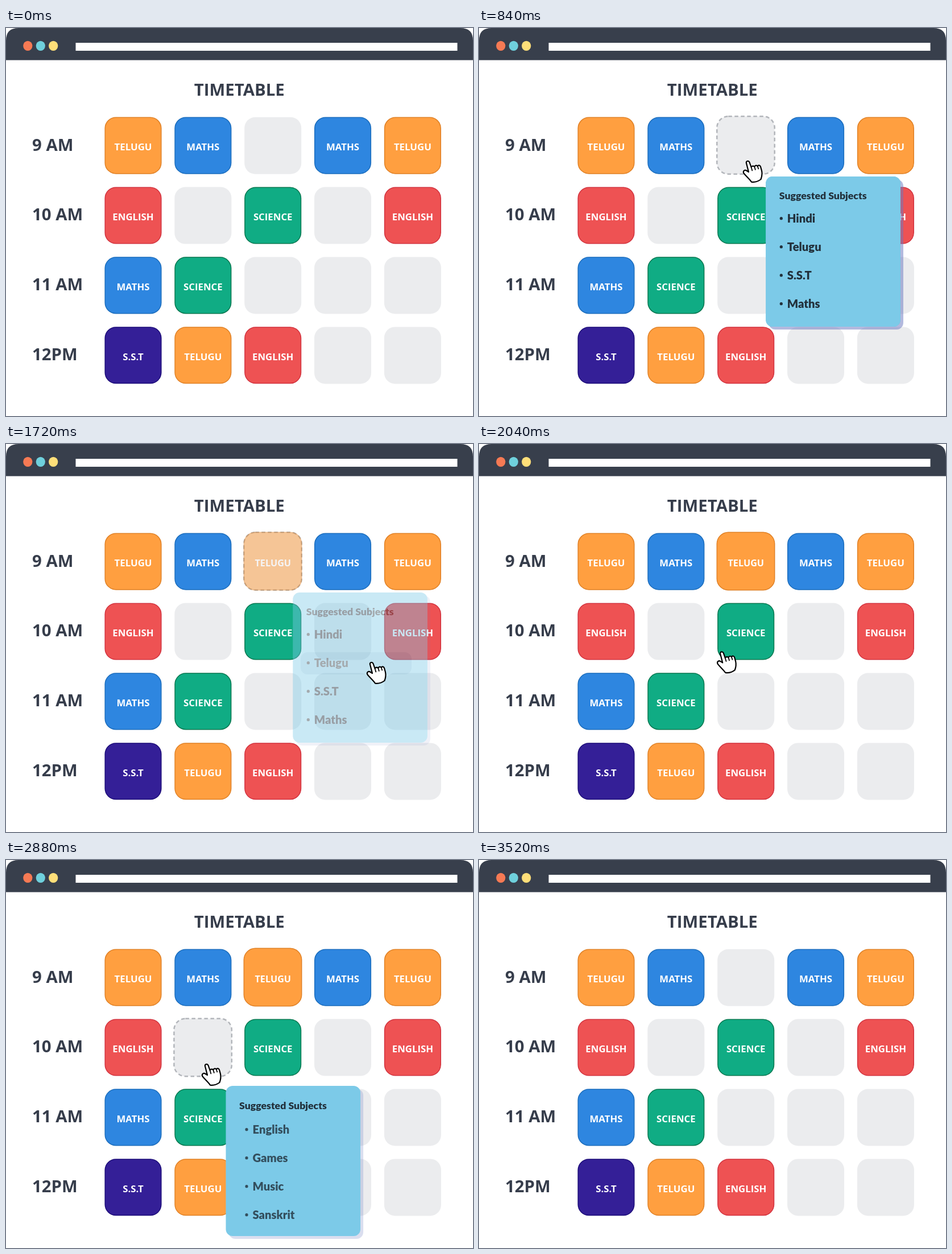
Write an HTML page that moves like this. It is 821x682 px and loops after 5040 ms.

```html
<!DOCTYPE html>
<html lang="en">
<head>
<meta charset="utf-8">
<title>Timetable</title>
<style>
  html, body { margin: 0; width: 100%; height: 100%; overflow: hidden; background: #fff; }
  svg { display: block; width: 100vw; height: 100vh; }
  text { font-family: "Open Sans", "Noto Sans", sans-serif; font-weight: 700; }
  .big { font-size: 29.4px; fill: #363d4b; }
  .label { font-size: 16.8px; fill: #fff; text-anchor: middle; }
  .head, .item { font-family: Lato, "Open Sans", sans-serif; font-weight: 900; fill: #22303b; }
  .head { font-size: 17.7px; }
  .item { font-size: 20.2px; }
  .dash { fill: #ebecee; stroke: #b3b6bb; stroke-width: 2.5; stroke-dasharray: 6.5 4.5; }
</style>
</head>
<body>
<svg viewBox="0 0 821 682" xmlns="http://www.w3.org/2000/svg">
  <defs>
    <g id="menu1"></g>
    <g id="menu2"></g>
  </defs>

  <path d="M0 56.5V22Q0 0 22 0H799Q821 0 821 22V56.5Z" fill="#383f4c"/>
  <ellipse cx="38.3" cy="31.3" rx="8.1" ry="8.6" fill="#f67a54"/>
  <ellipse cx="60.8" cy="31.3" rx="8.1" ry="8.6" fill="#6fd0dc"/>
  <ellipse cx="83.2" cy="31.3" rx="8.1" ry="8.6" fill="#ffdf79"/>
  <rect x="122.5" y="26" width="671" height="14" fill="#fff"/>
  <text class="big" x="410.3" y="119" text-anchor="middle">TIMETABLE</text>

  <g id="grid"></g>

  <rect id="slot1" class="dash" x="418.3" y="155.3" width="101.4" height="101.4" rx="20"/>
  <g id="pick">
    <rect x="418.3" y="155.3" width="101.4" height="101.4" rx="20" fill="#ff9f40" stroke="#e08126" stroke-width="1.5"/>
    <text class="label" x="469.3" y="215" style="font-size:16.2px">TELUGU</text>
  </g>
  <rect id="slot2" class="dash" x="295.4" y="278.8" width="101.4" height="101.4" rx="20"/>

  <g id="popup1"></g>
  <g id="popup2"></g>

  <g id="hand" stroke="#000" stroke-width="2.2" stroke-linejoin="round" stroke-linecap="round">
    <path fill="#fff" d="M7 5.5C6 1.5 11 .6 12.5 4L15.5 12.5C17 10.2 20 10 21.3 12C22.3 9.2 25.3 8.8 26.8 11C28 8.5 31 8.8 32 11.8L34 19C35.2 25 34.5 29 32.5 34C28 37.5 21 39.3 16 38.6C13 34 7 29 2.6 23.5C.5 20 3.5 16.5 7 18.5L11 21Z"/>
    <path fill="none" stroke-width="1.8" d="M15.5 12.5L17.3 18.5M21.3 12L22.8 17M26.8 11L28.2 15.5"/>
  </g>
</svg>

<script>
const $ = id => document.getElementById(id);
const LOOP = 5040, STEP = 40, COPIES = 8, SHUTTER = 12;

// Timetable cells
const subjects = {
  T: ['TELUGU', '#ff9f40', '#e08126'],
  M: ['MATHS', '#2e86e0', '#1b6dbd'],
  E: ['ENGLISH', '#ee5253', '#d2323e'],
  S: ['SCIENCE', '#10ac84', '#08774f'],
  P: ['S.S.T', '#341f97', '#1b0b78']
};
const rows = [['9 AM', 'TM-MT'], ['10 AM', 'E-S-E'], ['11 AM', 'MS---'], ['12PM', 'PTE--']];

$('grid').innerHTML = rows.map(([time, week], r) => {
  const y = 157 + r * 122.9;
  const cells = [...week].map((key, c) => {
    const x = 173.9 + c * 122.85, s = subjects[key];
    if (!s) return `<rect x="${x - .4}" y="${y - .3}" width="100" height="100" rx="19" fill="#ebecee"/>`;
    return `<rect x="${x + .3}" y="${y + .3}" width="98.6" height="98.6" rx="19" fill="${s[1]}" stroke="${s[2]}" stroke-width="1.5"/>
      <text class="label" x="${x + 49.6}" y="${y + 58.4}">${s[0]}</text>`;
  });
  return `<text class="big" x="46" y="${y + 58.5}">${time}</text>` + cells.join('');
}).join('');

// Suggestion menus, drawn from their top left corner
function buildMenu(id, items, x, y, dy, headY, extra, alpha) {
  const list = items.map((name, i) =>
    `<circle cx="${x - 10.5}" cy="${y - 7.3 + i * dy}" r="2.6" fill="#22303b"/>
     <text class="item" x="${x}" y="${y + i * dy}">${name}</text>`).join('');
  $(id).innerHTML = `<rect x="5" y="5" width="236.6" height="264" rx="12" fill="#6e7dbe" fill-opacity=".25"/>
    <rect width="236.6" height="264" rx="12" fill="#7ccae8"/>${extra}
    <text class="head" x="23.5" y="${headY}">Suggested Subjects</text>
    <g opacity="${alpha}">${list}</g>`;
}
buildMenu('menu1', ['Hindi', 'Telugu', 'S.S.T', 'Maths'], 37.5, 81, 50, 40,
  '<rect id="hover" x="13.7" y="105" width="195" height="39" rx="12" fill="#67b8da"/>', 1);
buildMenu('menu2', ['English', 'Games', 'Music', 'Sanskrit'], 47, 84, 50, 41, '', .8);

for (const n of [1, 2])
  $('popup' + n).innerHTML = `<use href="#menu${n}"/>`.repeat(COPIES);

// Timing helpers
const ramp = (t, a, b) => Math.min(1, Math.max(0, (t - a) / (b - a)));
const outQuart = p => 1 - (1 - p) ** 4;
const inOut = p => p < .5 ? 4 * p ** 3 : 1 - 4 * (1 - p) ** 3;
const fade = (id, v) => {
  $(id).setAttribute('opacity', v);
  $(id).setAttribute('display', v > 0 ? 'inline' : 'none');
};

// Grows from the corner; stacked copies average into motion blur
function showPopup(id, t, x, y, start, out, outEnd) {
  const grow = u => outQuart(ramp(u, start, start + 264));
  fade(id, grow(t) ** .75 * (1 - ramp(t, out, outEnd)));
  const still = grow(t - SHUTTER / 2) === 1;
  [...$(id).children].forEach((copy, k) => {
    const s = grow(t + SHUTTER * (.5 - k / (COPIES - 1)));
    copy.setAttribute('transform', `translate(${x} ${y}) scale(${s})`);
    copy.setAttribute('opacity', still ? 1 : 1 / (k + 1));
    copy.setAttribute('display', still && k ? 'none' : 'inline');
  });
}

// Pointer moves: start, end, destination
const moves = [[0, 560, 463, 232], [840, 1280, 633, 382], [1740, 2240, 343, 357]];
function pointer(t) {
  let x = 497, y = 359;
  for (const [a, b, tx, ty] of moves) {
    const p = inOut(ramp(t, a, b));
    x += (tx - x) * p;
    y += (ty - y) * p;
  }
  $('hand').setAttribute('transform', `translate(${x} ${y})`);
  fade('hand', ramp(t, 0, 140) * (1 - ramp(t, 2880, 3040)));
}

function draw(t) {
  fade('slot1', ramp(t, 380, 540) * (1 - ramp(t, 1720, 1840)));
  fade('pick', ramp(t, 1640, 1800) * (1 - ramp(t, 3060, 3240)));
  fade('slot2', ramp(t, 2060, 2220) * (1 - ramp(t, 3360, 3520)));
  fade('hover', ramp(t, 1040, 1160));
  showPopup('popup1', t, 504.3, 261, 581, 1640, 1775);
  showPopup('popup2', t, 386.5, 397, 2261, 2880, 3040);
  pointer(t);
}

const begin = performance.now();
function frame() {
  const t = (performance.now() - begin) % LOOP;
  draw(Math.floor(t / STEP) * STEP);
  requestAnimationFrame(frame);
}
frame();
</script>
</body>
</html>
```
